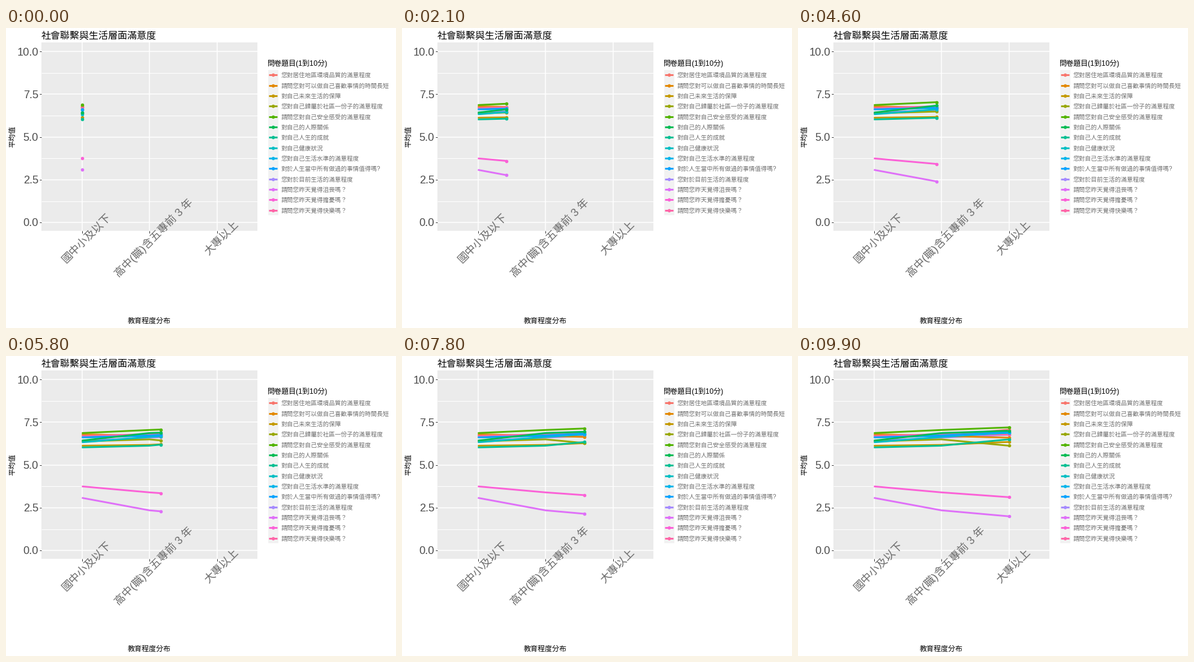
These frames come from a looping animation (650 by 500 pixels, 10000 ms). A matplotlib script:

```python
import numpy as np
import matplotlib.pyplot as plt
from matplotlib.animation import FuncAnimation
from matplotlib.patches import Rectangle

W, H, DPI = 650, 500, 100
FRAMES, INTERVAL = 100, 100
PT = 72 / DPI  # points per pixel

plt.rcParams["font.family"] = ["Liberation Sans", "Noto Sans CJK JP"]

LEFT, RIGHT, TOP, BOTTOM = 59, 419, 24, 338
LEVELS = np.array([126.5, 239.0, 351.5])
LEVEL_NAMES = ["國中小及以下", "高中(職)含五專前 3 年", "大專以上"]

# question, colour, mean score at each education level
SERIES = [
    ("您對居住地區環境品質的滿意程度", "#F8766D", (6.74, 6.72, 7.07)),
    ("請問您對可以做自己喜歡事情的時間長短", "#E38900", (6.80, 6.70, 6.60)),
    ("對自己未來生活的保障", "#C49A00", (6.13, 6.18, 6.35)),
    ("您對自己歸屬於社區一份子的滿意程度", "#99A800", (6.38, 6.50, 6.13)),
    ("請問您對自己安全感受的滿意程度", "#53B400", (6.87, 7.05, 7.20)),
    ("對自己的人際關係", "#00BC56", (6.43, 6.87, 7.00)),
    ("對自己人生的成就", "#00C094", (6.03, 6.13, 6.50)),
    ("對自己健康狀況", "#00BFC4", (6.33, 6.64, 6.90)),
    ("您對自己生活水準的滿意程度", "#00B6EB", (6.62, 6.70, 6.88)),
    ("對於人生當中所有做過的事情值得嗎?", "#06A4FF", (6.61, 6.73, 6.93)),
    ("您對於目前生活的滿意程度", "#A58AFF", (6.42, 6.60, 6.77)),
    ("請問您昨天覺得沮喪嗎？", "#DF70F8", (3.08, 2.35, 2.00)),
    ("請問您昨天覺得擔憂嗎？", "#FB61D7", (3.75, 3.40, 3.12)),
    ("請問您昨天覺得快樂嗎？", "#FF66A8", (6.70, 6.80, 6.78)),
]
STACK = [0, 10, 1, 13, 2, 3, 4, 6, 7, 8, 9, 5, 11, 12]


def score_y(v):
    return 324.2 - 28.5 * np.asarray(v)


fig = plt.figure(figsize=(W / DPI, H / DPI), dpi=DPI, facecolor="white")
ax = fig.add_axes([0, 0, 1, 1])
ax.set_xlim(0, W)
ax.set_ylim(H, 0)
ax.axis("off")


def box(x, y, w, h, color):
    ax.add_patch(Rectangle((x, y), w, h, fc=color, ec="none", zorder=0))


def rule(xs, ys, color, width, **kw):
    return ax.plot(xs, ys, color=color, lw=width * PT,
                   solid_capstyle="butt", **kw)[0]


def label(x, y, s, size, color="black", ha="center", rotation=0):
    ax.text(x, y, s, fontsize=size * PT, color=color, ha=ha, va="center",
            rotation=rotation)


def dot(x, y, color, zorder):
    return ax.plot(x, y, "o", ms=5.6 * PT, color=color, mew=0,
                   zorder=zorder)[0]


# panel, grid and axes
box(LEFT, TOP, RIGHT - LEFT, BOTTOM - TOP, "#EBEBEB")
for v in (1.25, 3.75, 6.25, 8.75):
    rule([LEFT, RIGHT], [score_y(v)] * 2, "white", 1, zorder=1)
for v in (0, 2.5, 5, 7.5, 10):
    y = score_y(v)
    rule([LEFT, RIGHT], [y, y], "white", 1.5, zorder=1)
    rule([LEFT - 3.5, LEFT], [y, y], "#333333", 1)
    label(54, y + 1.8, f"{v:.1f}", 18.3, "#4D4D4D", ha="right")
for x, name in zip(LEVELS, LEVEL_NAMES):
    rule([x, x], [TOP, BOTTOM], "white", 1.5, zorder=1)
    rule([x, x], [BOTTOM, BOTTOM + 3.5], "#333333", 1)
    label(x + 7.5, 350, name, 18, "#6A6A6A", rotation=45)

label(58.5, 13.5, "社會聯繫與生活層面滿意度", 16, ha="left")
label(239, 489, "教育程度分布", 12)
label(11, 181, "平均值", 12, rotation=90)

# legend
label(436, 59, "問卷題目(1到10分)", 12, ha="left")
for i, (name, color, _) in enumerate(SERIES):
    y = 78.4 + 17.32 * i
    box(436.5, y - 8.7, 17.3, 17.4, "#F2F2F2")
    rule([438, 452], [y, y], color, 3, zorder=2)
    dot([445], [y], color, 3)
    label(459, y + 1, name, 10, "#707070", ha="left")

# moving lines and points
tracks = []
for z, i in enumerate(STACK):
    _, color, means = SERIES[i]
    line = rule([], [], color, 2.9, zorder=10 + z)
    tracks.append((line, dot([], [], color, 30 + z), score_y(means)))


def update(frame):
    x = LEVELS[0] + (LEVELS[-1] - LEVELS[0]) * frame / (FRAMES - 1)
    passed = LEVELS < x
    for line, point, ys in tracks:
        y = np.interp(x, LEVELS, ys)
        line.set_data(np.append(LEVELS[passed], x), np.append(ys[passed], y))
        point.set_data([x], [y])
    return [artist for track in tracks for artist in track[:2]]


anim = FuncAnimation(fig, update, frames=FRAMES, interval=INTERVAL,
                     repeat=True, repeat_delay=0, blit=False)
plt.show()
```
